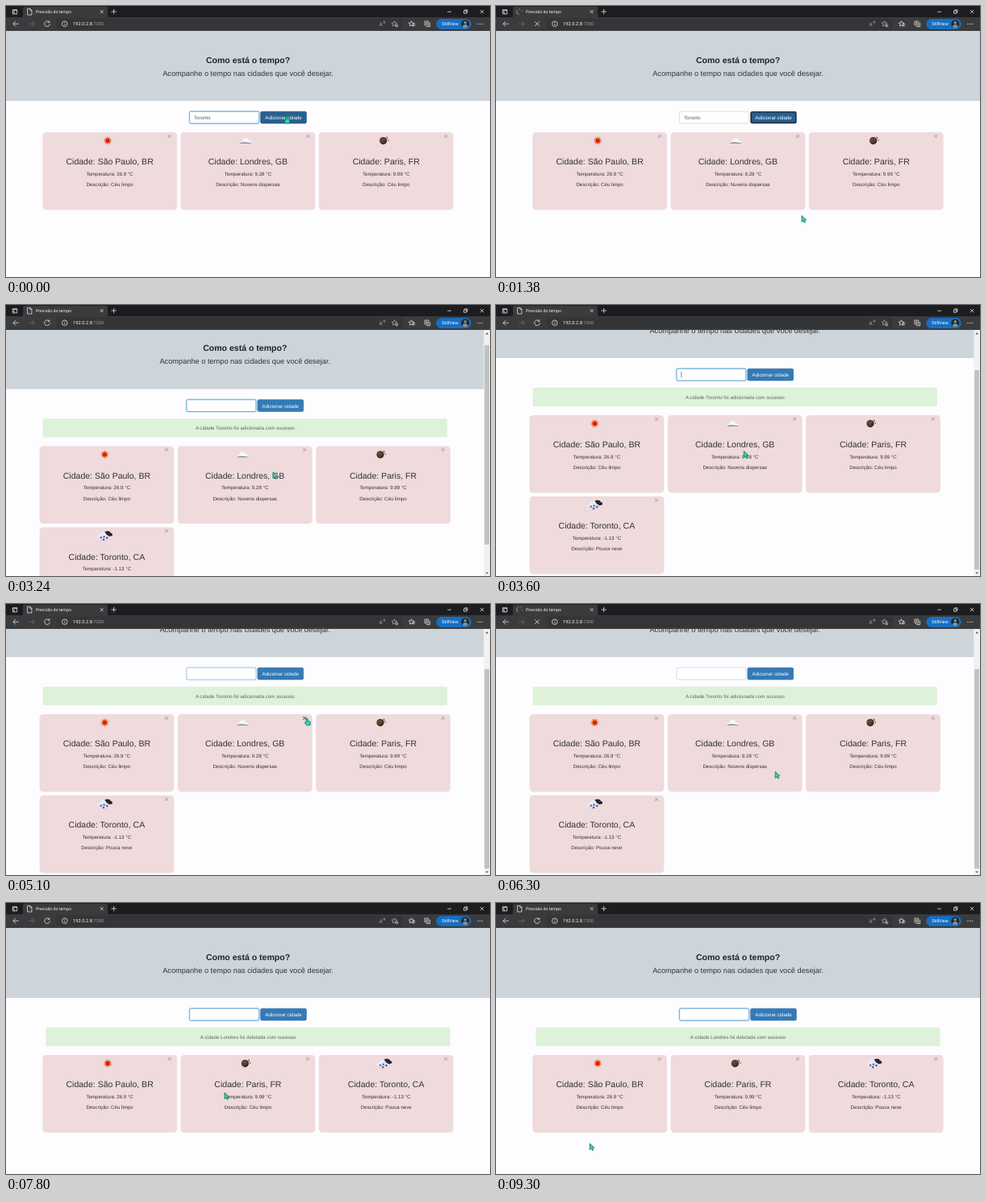
Recreate the animation shown at these times as an HTML page. Size 600 px wide and 337 px high, loop 9600 ms.

```html
<!DOCTYPE html>
<html lang="pt-BR">
<head>
<meta charset="utf-8">
<title>Previsão do tempo</title>
<style>
  html, body { margin: 0; width: 100%; height: 100%; overflow: hidden; background: #fdfcfe; }
  svg { display: block; width: 100vw; height: 100vh; }
  text { font-family: "Liberation Sans", Arial, sans-serif; text-rendering: geometricPrecision; white-space: pre; }
  .ui text { font-family: Roboto, sans-serif; }
  .line { fill: none; stroke: #e4e4e4; stroke-width: .8; }
  .dim { stroke: #a9a9a9; }
</style>
</head>
<body>
<svg viewBox="0 0 600 337" xmlns="http://www.w3.org/2000/svg">
  <defs><clipPath id="view"><rect y="31" width="600" height="306"/></clipPath></defs>
  <rect width="600" height="337" fill="#fdfcfe"/>
  <g clip-path="url(#view)"><g id="page"></g></g>
  <g id="bar">
    <rect x="592.3" y="31" width="8" height="306" fill="#f1f1f1"/>
    <rect id="thumb" x="593.2" width="5.8" height="248" fill="#c1c1c1"/>
    <path d="M594.4 36.4l1.8-2.2 1.8 2.2z" fill="#505050"/>
    <path d="M594.4 332.4l1.8 2.2 1.8-2.2z" fill="#505050"/>
  </g>
  <g class="ui" id="ui"></g>
  <g id="cursor" stroke="#1b5a50" stroke-width=".7" stroke-linejoin="round" fill="#1fe0b0">
    <path id="arrow" d="M0 0V8L1.9 6.3L3.4 8.8L4.5 8.1L3.3 5.7L5.7 5.3Z"/>
    <path id="hand" d="M-1 .8Q0-.6 1 .8V3.6L3.7 4.3Q4.8 4.8 4.5 6.4L3.8 9H-.5L-2.6 5.9Q-2.4 4.6-1 5.5Z"/>
  </g>
</svg>
<script>
const LOOP = 9600, STEP = 60;
const ADDED = 2640, CLICK_X = 5040, DELETED = 6420, BLINK = 411;
const HOST = '192.0.2.8', PORT = ':7300';
const $ = id => document.getElementById(id);
const clamp = v => Math.max(0, Math.min(1, v));
const ease = v => v * v * (3 - 2 * v);
const ramp = (t, a, b) => clamp((t - a) / (b - a));
const show = (id, on) => $(id).setAttribute('display', on ? 'inline' : 'none');

const rect = (x, y, w, h, fill, r = 0, more = '') =>
  `<rect x="${x}" y="${y}" width="${w}" height="${h}" rx="${r}" fill="${fill}" ${more}/>`;
const text = (x, y, size, s, fill = '#333', more = '') =>
  `<text x="${x}" y="${y}" font-size="${size}" fill="${fill}" ${more}>${s}</text>`;
const mid = (x, y, size, s, fill, more = '') => text(x, y, size, s, fill, 'text-anchor="middle" ' + more);
const circle = (x, y, r, fill, more = '') => `<circle cx="${x}" cy="${y}" r="${r}" fill="${fill}" ${more}/>`;
const line = (d, more = '') => `<path class="line" d="${d}" ${more}/>`;

function star(n, inner, outer) {
  let d = '';
  for (let i = 0; i < 2 * n; i++) {
    const r = i % 2 ? inner : outer, a = Math.PI * (i / n - .5);
    d += `${i ? 'L' : 'M'}${(r * Math.cos(a)).toFixed(2)} ${(r * Math.sin(a)).toFixed(2)}`;
  }
  return d + 'Z';
}

const icons = {
  sun: `<path d="${star(10, 2.8, 5.6)}" fill="#cf5a22"/>` + circle(0, 0, 3.2, '#f0a03c') + circle(0, 0, 2.6, '#e8170f'),
  cloud: '<path d="M-7.5 3.5Q-7.5 1.2-4.6 .9Q-3.8-3.5-.2-3.4Q2.6-3.5 3.2-.6Q7.3 .2 7.5 3.5Z" fill="#f6f6f8"/>' +
    '<path d="M-7.5 3.6Q-6.6 1.6 0 2T7.5 3.6Z" fill="#8f8b92"/>',
  moon: circle(-1, .2, 4.6, '#3d241c') + circle(-1.5, -.4, 3.4, '#65463a') + circle(.2, 1.2, 1.2, '#4a2e25') +
    circle(-2.6, 1.4, .7, '#4a2e25') +
    [[4.2, -2.8], [5.4, -.4], [3.4, -4.2]].map(([x, y]) => circle(x, y, .65, '#3d241c')).join(''),
  snow: '<path d="M-1-2.2Q0-6.4 3.6-5.6Q6.6-6 7.2-3.6Q10-3 9.6-.2Q6 1.4 2.6 .6Z" fill="#29262c"/>' +
    '<path d="M-9.5 2.8Q-9.4-.4-6.6-.8Q-5.6-4.8-2-4.6Q1.6-4.4 2-1.2Q5.4-.6 5.6 2.8Z" fill="#e9ecf7"/>' +
    [[-4.6, 2.2], [-.8, 1.2], [2.8, 2.6], [-1.4, 4.8]].map(([x, y]) =>
      `<path transform="translate(${x} ${y})" d="${star(6, .8, 1.9)}" fill="#2f50b0"/>`).join('')
};

const cities = {
  sp: ['São Paulo, BR', '26.9', 'Céu limpo', 'sun'],
  ld: ['Londres, GB', '9.28', 'Nuvens dispersas', 'cloud'],
  pa: ['Paris, FR', '9.99', 'Céu limpo', 'moon'],
  to: ['Toronto, CA', '-1.13', 'Pouca neve', 'snow']
};

function card(key, i, top, loaded) {
  const [name, temp, sky, icon] = cities[key];
  const x = 45.3 + i % 3 * 171.3, y = top + Math.floor(i / 3) * 101, c = x + 83.3;
  const dy = loaded ? y : y - 13;
  return rect(x, y, 166.7, 96.6, '#efdadc', 4.6) +
    (loaded ? `<g transform="translate(${c - 2.5} ${y + 10.4})">${icons[icon]}</g>` : '') +
    mid(x + 157.4, y + 7.6, 9.2, '×', '#000', `font-weight="bold" opacity=".22" id="x-${key}"`) +
    mid(c, dy + 40.1, 10.54, 'Cidade: ' + name) +
    mid(c, dy + 53.9, 6.15, `Temperatura: ${temp} °C`) +
    mid(c, dy + 67.1, 6.15, 'Descrição: ' + sky);
}

function pageMarkup(keys, notice, value, snowReady) {
  const field = (more) => rect(227.6, 131.2, 86, 14.8, 'none', 1.8, more);
  return rect(-10, 31, 620, 87, '#ced5da') +
    mid(300, 70.6, 10.54, 'Como está o tempo?', '#222', 'font-weight="bold"') +
    mid(300, 86.8, 9.22, 'Acompanhe o tempo nas cidades que você desejar.') +
    `<g id="glow">${field('stroke="#66afe9" stroke-opacity=".35" stroke-width="2.4"')}</g>` +
    rect(227.6, 131.2, 86, 14.8, '#fff', 1.8, 'stroke="#c8c8c8" stroke-width=".6"') +
    `<g id="edge">${field('stroke="#58a6dc" stroke-width=".8"')}</g>` +
    text(233, 141, 6.15, value, '#555') +
    rect(233.3, 135, .6, 7.4, '#333', 0, 'id="caret"') +
    rect(315.6, 131.2, 56.8, 14.8, '#337ab7', 1.8, 'id="button" stroke-width=".6"') +
    rect(316.4, 132, 55.2, 13.2, 'none', 1.2, 'id="ring" stroke="#14181d" stroke-width=".9"') +
    mid(344, 141, 6.15, 'Adicionar cidade', '#fff') +
    (notice ? rect(49.4, 154.8, 501.2, 23.3, '#ddf2d8', 1.8) +
      mid(300, 168.7, 6.15, notice, '#566d57') : '') +
    keys.map((k, i) => card(k, i, notice ? 189 : 157, k !== 'to' || snowReady)).join('');
}

$('ui').innerHTML =
  rect(0, 0, 600, 14.5, '#1c1d20') + rect(0, 14, 600, 17, '#3a3b3d') +
  '<path d="M19 14.5Q21 14.5 21 12V3Q21 .8 23.2 .8H124Q126 .8 126 3V12Q126 14.5 128 14.5Z" fill="#3a3b3d"/>' +
  rect(62.5, 15.6, 429, 13.6, '#343537', 2) +
  line('M8.3 4.7h5.4v5.2H8.3zM8.3 5.6h5.4') + line('M8.3 7.6h2v2.3') +
  `<g id="favicon">${line('M26.6 3.4h3.3l2 2v5.6h-5.3zM29.9 3.4v2h2')}</g>` +
  '<g id="spinner"><circle class="line dim" cx="29" cy="7.2" r="3.3" stroke-dasharray="7.5 2 1.2 2.4 1.2 6.4"/></g>' +
  text(37, 9.1, 5.27, '', '#f2f2f2', 'id="tab"') +
  line('M116.8 5.2l3.8 3.8M120.6 5.2l-3.8 3.8M130.5 7h6.4M133.7 3.8v6.4') +
  line('M547.3 7.2h4.6M587.9 4.9l4.4 4.4M592.3 4.9l-4.4 4.4') + line('M567.6 6h3.2v3.2h-3.2zM568.8 6v-1.2h3.2v3.2h-1.2') +
  line('M15.8 22.2H8.8M12 19l-3.2 3.2 3.2 3.2') +
  line('M28.3 22.2h7M32.1 19l3.2 3.2-3.2 3.2', 'style="stroke:#6d6e70"') +
  `<g id="reload">${line('M53.3 19.8A3.3 3.3 0 1 0 54.3 22.2M53.9 18.3v2h-2.2')}</g>` +
  `<g id="stop">${line('M48.2 19.4l5.6 5.6M53.8 19.4l-5.6 5.6')}</g>` +
  line('M69.5 22.2a3.3 3.3 0 1 0 6.6 0a3.3 3.3 0 1 0-6.6 0M72.8 21.8v2.2M72.8 20.2v.8') +
  text(83, 24.3, 5.75, `${HOST}<tspan fill="#9a9b9d">${PORT}</tspan>`, '#f4f4f4') +
  text(462.5, 24.7, 6.5, 'A', '#a9a9a9') + line('M467.6 19.2q1.2 .9 0 2M468.9 18.4q2 1.6 0 3.4', 'style="stroke-width:.5"') +
  [[481.5, 1], [502.5, 0]].map(([x, add]) =>
    `<path class="line ${add ? 'dim' : ''}" transform="translate(${x} 22.2)" d="${star(5, 1.6, 3.5)}"/>` +
    (add ? circle(x + 2.8, 24.4, 1.9, '#a9a9a9') + line(`M${x + 1.7} 24.4h2.2M${x + 2.8} 23.3v2.2`, 'style="stroke:#343537;stroke-width:.5"')
      : line('M504.2 22.6h3.2M503.8 24.6h3.2'))).join('') +
  line('M519 19h4.8v4.8H519zM521 25.6h4.6v-4.8M521.4 20.2v2.4M520.2 21.4h2.4') +
  rect(533.3, 16, 43.4, 13, '#176fc1', 6.5) +
  text(540.2, 24.3, 5.4, 'StillView', '#fff') +
  circle(569.3, 22.4, 5, '#20292d') + circle(569.3, 20.7, 1.8, '#829199') +
  '<path d="M565.9 25.9Q566.4 23 569.3 23T572.7 25.9Q571 27.4 569.3 27.4T565.9 25.9Z" fill="#829199"/>' +
  [585, 587.7, 590.4].map(x => circle(x, 22.4, .65, '#e8e8e8')).join('');

// Pointer moves: start, end, x, y
const moves = [
  [150, 960, 379, 260.7],
  [2760, 3540, 307.3, 181.6],
  [4300, 4980, 373, 141.8],
  [5220, 5940, 346.2, 208.5],
  [7260, 8100, 240, 247],
  [8220, 8940, 116.2, 299]
];

function pointer(t) {
  let x = 347.3, y = 137;
  for (const [a, b, nx, ny] of moves) {
    const k = ease(ramp(t, a, b));
    x += (nx - x) * k;
    y += (ny - y) * k;
  }
  return [x, y];
}

function focusLevel(t) {
  if (t < ADDED) return 1 - ramp(t, 0, 180);
  if (t < CLICK_X) return ramp(t, ADDED, ADDED + 150);
  if (t < DELETED) return .6 * (1 - ramp(t, CLICK_X, CLICK_X + 180));
  return ramp(t, DELETED, DELETED + 150);
}

function caretOn(t) {
  const since = t >= DELETED ? t - DELETED : t >= ADDED && t < CLICK_X ? t - ADDED : -1;
  return since >= 0 && Math.floor(since / BLINK) % 2 === 0;
}

let shown = '';
function setPage(t) {
  const added = t >= ADDED && t < DELETED, ready = t >= 2820;
  const key = t < ADDED ? 'start' : added ? 'added' + ready : 'deleted';
  if (key === shown) return;
  shown = key;
  $('page').innerHTML = t < ADDED ? pageMarkup(['sp', 'ld', 'pa'], '', 'Toronto', true)
    : added ? pageMarkup(['sp', 'ld', 'pa', 'to'], 'A cidade Toronto foi adicionada com sucesso', '', ready)
    : pageMarkup(['sp', 'pa', 'to'], 'A cidade Londres foi deletada com sucesso', '', true);
}

function draw(t) {
  setPage(t);
  const long = t >= ADDED && t < DELETED;
  const scroll = long ? ease(ramp(t, 3120, 3480)) : 0;
  $('page').setAttribute('transform', `translate(${long ? -3.7 : 0} ${-52 * scroll})`);
  show('bar', long);
  $('thumb').setAttribute('y', 39 + 42 * scroll);

  const [x, y] = pointer(t);
  const onButton = t < ADDED && y < 146;
  const onClose = t >= 4860 && t < DELETED && x > 367 && y < 147;
  $('cursor').setAttribute('transform', `translate(${x} ${y})`);
  show('hand', onButton || onClose);
  show('arrow', !(onButton || onClose));
  if ($('x-ld')) $('x-ld').setAttribute('opacity', onClose ? .55 : .22);

  const level = focusLevel(t), pressed = t >= 60 && t < ADDED;
  $('glow').setAttribute('opacity', level);
  $('edge').setAttribute('opacity', level);
  show('caret', caretOn(t));
  const button = $('button');
  button.setAttribute('fill', t < ADDED ? '#286090' : '#337ab7');
  button.setAttribute('stroke', pressed ? '#4c5a68' : t < ADDED ? '#204d74' : '#2e6da4');
  show('ring', pressed);

  const waiting = t >= 60 && t < ADDED || t >= 5160 && t < DELETED;
  const arriving = t >= ADDED && t < 2760 || t >= DELETED && t < DELETED + STEP;
  show('spinner', waiting);
  show('favicon', !waiting && !arriving);
  show('stop', waiting || arriving);
  show('reload', !waiting && !arriving);
  $('spinner').setAttribute('transform', `rotate(${95 - (t - 1380) * .36} 29 7.2)`);
  $('tab').textContent = arriving ? HOST + PORT : 'Previsão do tempo';
  $('tab').setAttribute('font-size', arriving ? 5 : 5.27);
}

const start = performance.now();
function tick() {
  const t = (performance.now() - start) % LOOP;
  draw(Math.floor(t / STEP) * STEP);
  requestAnimationFrame(tick);
}
tick();
</script>
</body>
</html>
```
